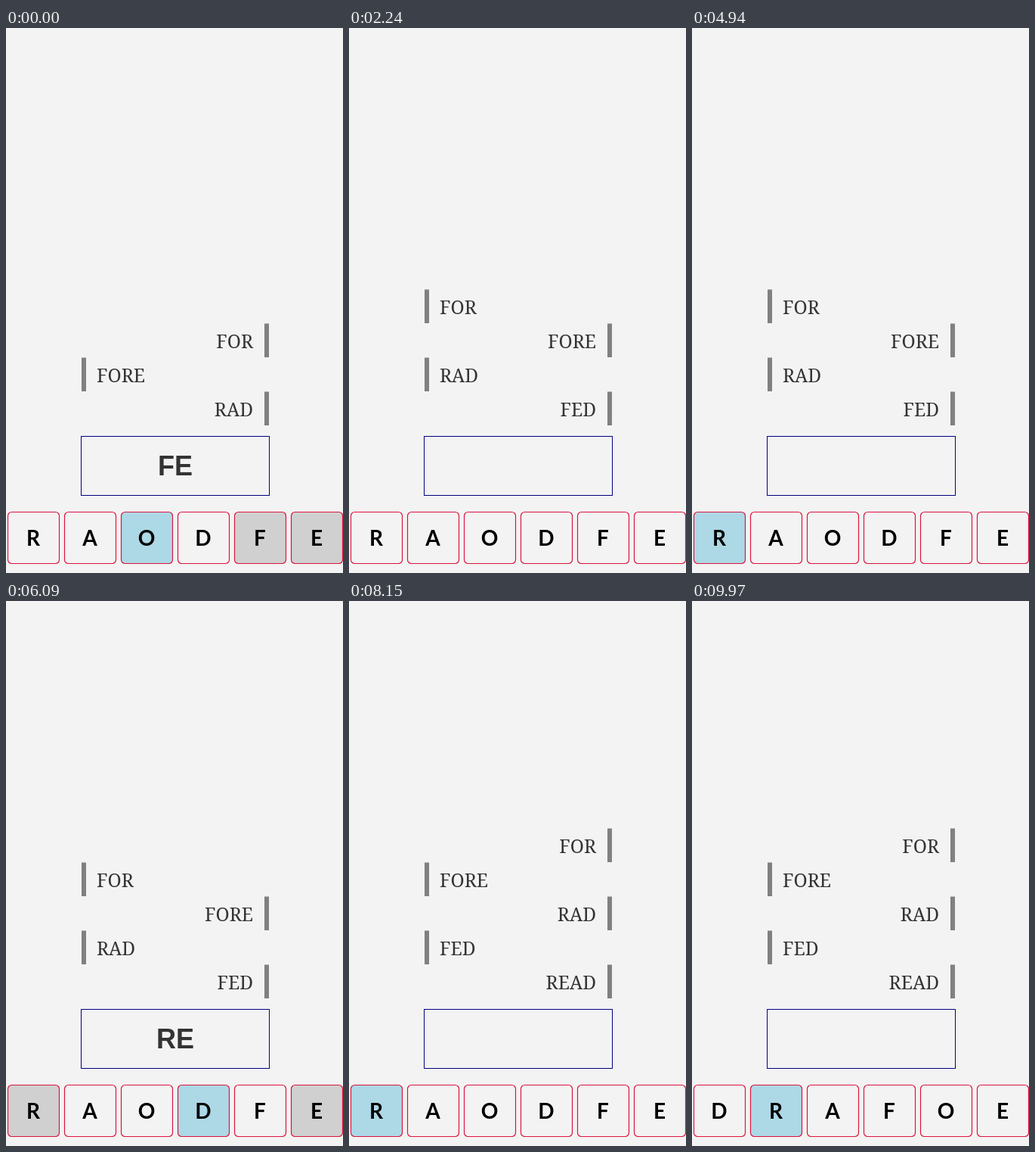
Animation, 446 px wide and 720 px high, one loop 10 s. Source, as an HTML page with a canvas:

```html
<!DOCTYPE html>
<html lang="en">
<head>
<meta charset="utf-8">
<title>Word tiles</title>
<style>
  html, body { margin: 0; width: 100%; height: 100%; overflow: hidden; background: #f3f3f3; }
  canvas { display: block; width: 446px; height: 720px; }
</style>
</head>
<body>
<canvas id="stage" width="446" height="720"></canvas>
<script>
const ctx = document.getElementById('stage').getContext('2d');
const LOOP = 10000;
const COLORS = {
  page: '#f3f3f3', text: '#333', bar: '#808080', box: '#000080',
  edge: '#dc143c', hover: '#add8e6', used: '#d0d0d0'
};

// Each timeline is a list of [start time, value].
const racks = [[0, 'RAODFE'], [9000, 'DRAFOE']];
const entries = [
  [0, 'FE'], [800, 'FED'], [2120, ''],
  [5050, 'R'], [5650, 'RE'], [6400, 'REA'], [6850, 'READ'], [7300, '']
];
const found = [
  [0, ['FOR', 'FORE', 'RAD']],
  [2120, ['FOR', 'FORE', 'RAD', 'FED']],
  [7300, ['FOR', 'FORE', 'RAD', 'FED', 'READ']]
];
// Index of the tile under the pointer, -1 for none.
const pointer = [
  [0, 2], [240, 3], [1500, -1],
  [3600, 2], [4150, 1], [4400, 0],
  [5150, 1], [5230, 2], [5310, 3], [5390, 4], [5480, 5],
  [5850, 4], [5980, 3], [6150, 2], [6240, 1],
  [6540, 2], [6650, 3], [7050, -1],
  [7850, 0], [8650, 1]
];

function valueAt(track, time) {
  let value = track[0][1];
  for (const [start, next] of track) if (start <= time) value = next;
  return value;
}

function label(text, x, y, font, align, color) {
  ctx.font = font;
  ctx.textAlign = align;
  ctx.fillStyle = color;
  ctx.fillText(text, x, y);
}

// The newest word sits on the right; older ones alternate upwards.
function drawWords(words) {
  words.forEach((word, i) => {
    const age = words.length - 1 - i;
    const y = 480 - age * 45;
    const right = age % 2 === 0;
    ctx.fillStyle = COLORS.bar;
    ctx.fillRect(right ? 342 : 100, y + 0.5, 6, 44.5);
    label(word, right ? 327 : 120, y + 33, '24.5px "Noto Serif", serif',
      right ? 'right' : 'left', COLORS.text);
  });
}

function drawEntry(text) {
  ctx.strokeStyle = COLORS.box;
  ctx.lineWidth = 1;
  ctx.strokeRect(99.5, 539.5, 249, 78);
  label(text, 224, 591, 'bold 36px "Liberation Sans", Arial, sans-serif', 'center', COLORS.text);
}

function drawTile(letter, index, fill) {
  const x = 2.5 + index * 75;
  ctx.beginPath();
  ctx.roundRect(x, 639.5, 68, 68, 5);
  ctx.fillStyle = fill;
  ctx.fill();
  ctx.strokeStyle = COLORS.edge;
  ctx.lineWidth = 1.2;
  ctx.stroke();
  label(letter, x + 33.5, 684, 'bold 28px Lato, sans-serif', 'center', '#000');
}

function draw(time) {
  const entry = valueAt(entries, time);
  const hovered = valueAt(pointer, time);
  ctx.fillStyle = COLORS.page;
  ctx.fillRect(0, 0, 446, 720);
  drawWords(valueAt(found, time));
  drawEntry(entry);
  [...valueAt(racks, time)].forEach((letter, i) => {
    const fill = entry.includes(letter) ? COLORS.used
      : i === hovered ? COLORS.hover : COLORS.page;
    drawTile(letter, i, fill);
  });
}

const begin = performance.now();
function tick() {
  draw((performance.now() - begin) % LOOP);
  requestAnimationFrame(tick);
}
tick();
</script>
</body>
</html>
```
